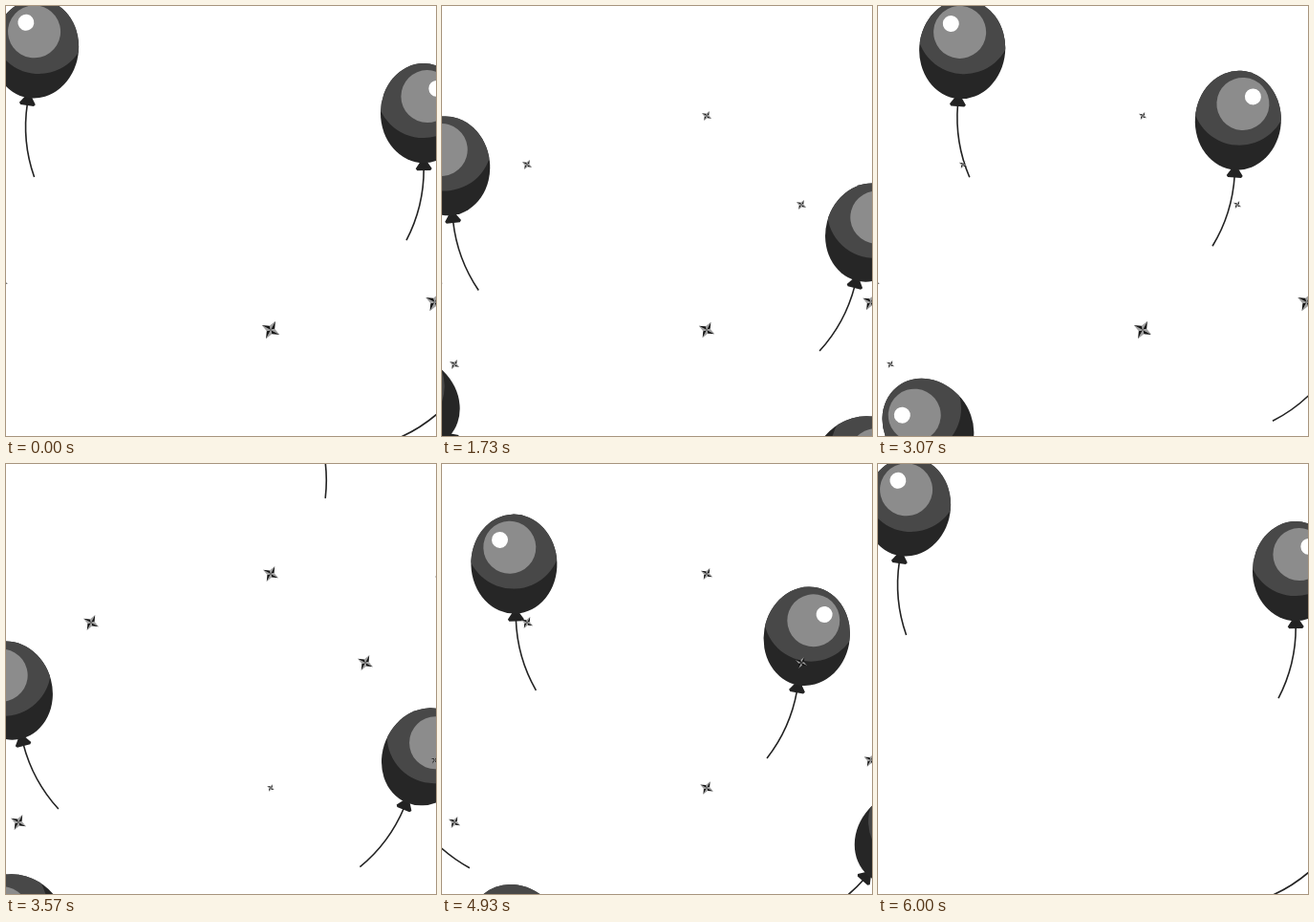
Animation of 450x450 px, one loop 6.03 s. Source, as an HTML page with a canvas:

```html
<!DOCTYPE html>
<html>
<head>
<meta charset="utf-8">
<style>
  html, body { margin: 0; width: 100%; height: 100%; overflow: hidden; background: #fff; }
  canvas { display: block; width: 450px; height: 450px; }
</style>
</head>
<body>
<canvas id="stage" width="450" height="450"></canvas>
<script>
const ctx = document.getElementById('stage').getContext('2d');
const LOOP = 6030, FPS = 30, STEPS = 180;
const SPIN = 45, LEAD = 7.5, TWINKLE = 1.55;
const rad = deg => deg * Math.PI / 180;
const clamp = v => Math.max(0, Math.min(1, v));

// Each balloon swings upwards on a wheel: hub, radius and angle at time zero
const wheels = [
  { x: -199, y: 197, r: 581, a: 40.35 },
  { x: -86, y: 215, r: 533, a: -9.63 },
  { x: -35, y: 129, r: 578, a: 69 },
  { x: -18, y: 121, r: 578, a: 26 }
];

// Stars of a group pulse together; "delay" staggers their first appearance
const groups = [
  { peak: 0, begin: -1, delay: 0, depth: .45, at: [[277, 339], [448.5, 310], [-7.5, 286]] },
  { peak: .73, begin: 0, delay: .2, depth: .28, at: [[277, 115], [376, 208], [457, 122], [13, 375], [89, 166]] }
];

function fill(color, path) {
  ctx.fillStyle = color;
  ctx.beginPath();
  path();
  ctx.fill();
}

const disc = (color, x, y, r) => fill(color, () => ctx.arc(x, y, r, 0, 7));

function poly(color, ...points) {
  fill(color, () => points.forEach(p => ctx.lineTo(...p)));
}

function balloon(x, y, angle) {
  ctx.save();
  ctx.translate(x, y);
  ctx.rotate(rad(angle));

  ctx.strokeStyle = '#222';
  ctx.lineWidth = 1.6;
  ctx.beginPath();
  ctx.moveTo(0, 58);
  ctx.quadraticCurveTo(0, 98, -18.5, 133);
  ctx.stroke();

  poly('#222', [-3, 50], [3, 50], [8.5, 58], [7, 60], [-7, 60], [-8.5, 58]);
  const body = () => ctx.ellipse(0, 0, 45, 52, 0, 0, 7);
  fill('#262626', body);
  ctx.save();
  ctx.beginPath();
  body();
  ctx.clip();
  disc('#484848', 0, -23.5, 49.5);
  ctx.restore();
  disc('#8c8c8c', 4, -17.5, 27.5);
  disc('#fff', 14, -25.7, 8.5);
  ctx.restore();
}

// Four balloons, a quarter turn apart, share each wheel; only the nearest can be seen
function balloons(t, lead) {
  for (const { x, y, r, a } of wheels) {
    const turn = a - SPIN * t - lead;
    const angle = turn - 90 * Math.round(turn / 90);
    balloon(x + r * Math.cos(rad(angle)), y + r * Math.sin(rad(angle)), 12 + 1.1 * angle);
  }
}

function star(x, y, size) {
  if (size < .15) return;
  ctx.save();
  ctx.translate(x, y);
  ctx.scale(size, size);
  ctx.rotate(rad(28));
  for (let n = 0; n < 4; n++) {
    poly('#a0a0a0', [0, 0], [0, -10.5], [-3.1, -3.1]);
    poly('#161616', [0, 0], [0, -10.5], [3.1, -3.1]);
    ctx.rotate(Math.PI / 2);
  }
  ctx.restore();
}

function stars(t) {
  for (const { peak, begin, delay, depth, at } of groups) {
    const pulse = 1 - depth + depth * Math.cos(2 * Math.PI * (t - peak) / TWINKLE);
    at.forEach(([x, y], i) => {
      const appear = clamp((t - begin - i * delay) / .15);
      star(x, y, pulse * appear * clamp((5.9 - t) / .4));
    });
  }
}

function draw(now) {
  const step = Math.floor((now % LOOP + 4) * FPS / 1000);
  const t = Math.max(1, step % STEPS) / FPS;
  ctx.fillStyle = '#fff';
  ctx.fillRect(0, 0, 450, 450);
  balloons(t, 0);
  // The left side mirrors the right, slightly ahead
  ctx.save();
  ctx.translate(450, 0);
  ctx.scale(-1, 1);
  balloons(t, LEAD);
  ctx.restore();
  stars(step / FPS);
}

let start;
function tick(now) {
  start ??= now;
  draw(now - start);
  requestAnimationFrame(tick);
}
draw(0);
requestAnimationFrame(tick);
</script>
</body>
</html>
```
